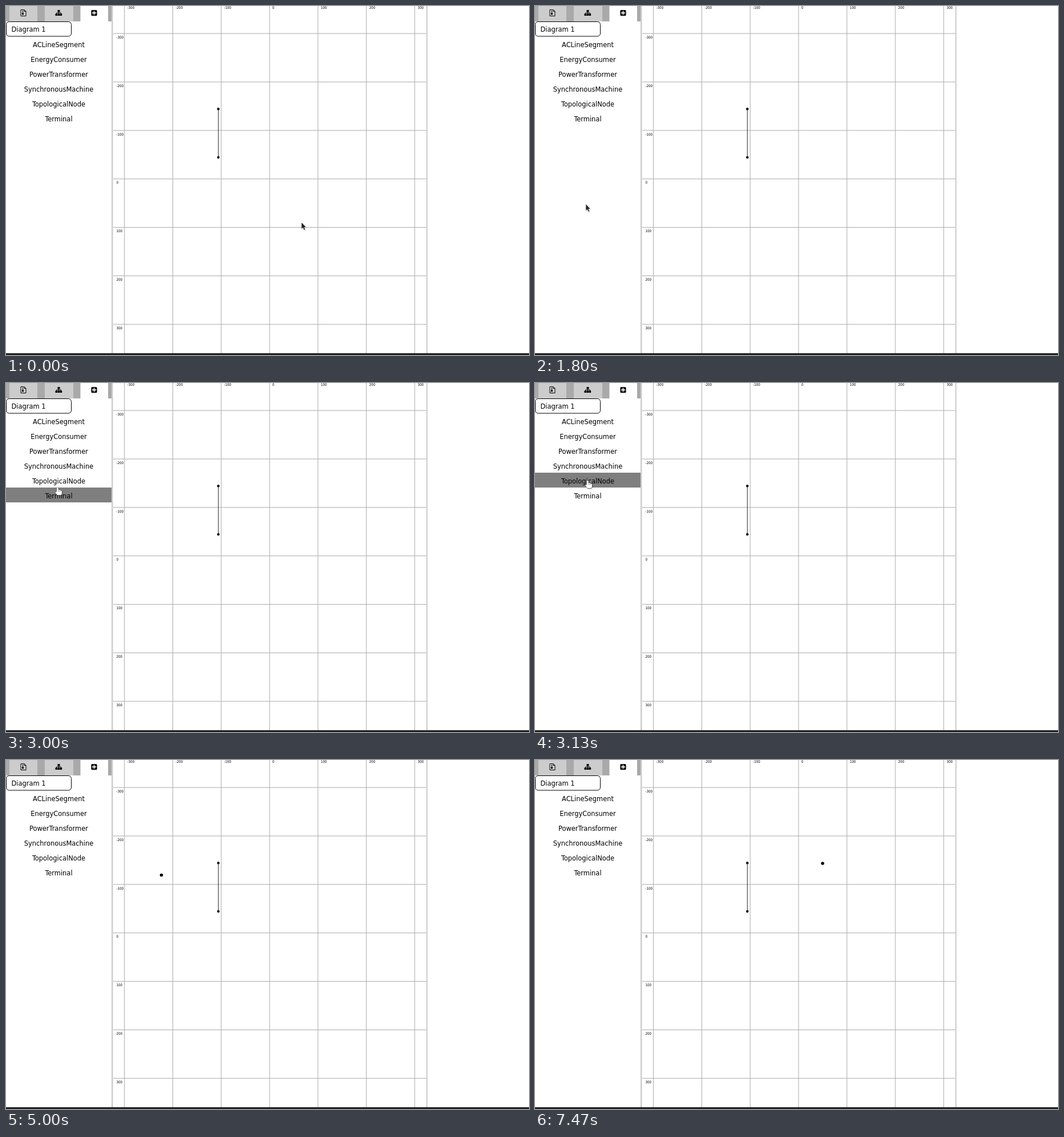
Write an HTML page with a canvas that moves like this. It is 917 px wide and 611 px high and loops after 8 s.

```html
<!DOCTYPE html>
<html lang="en">
<head>
<meta charset="utf-8">
<title>Diagram editor</title>
<style>
  html, body { margin: 0; width: 100%; height: 100%; overflow: hidden; background: #fff; }
  canvas { display: block; }
</style>
</head>
<body>
<canvas id="stage" width="917" height="611"></canvas>
<script>
const ctx = document.getElementById('stage').getContext('2d');
const LOOP = 8000, TICK = 200 / 3;
const ITEMS = ['ACLineSegment', 'EnergyConsumer', 'PowerTransformer',
  'SynchronousMachine', 'TopologicalNode', 'Terminal'];
const ROW_TOP = 53, ROW_H = 26, PANEL_W = 185;
const GRID = 84.85, ORIGIN = { x: 462.1, y: 302.7 };
const DRAG_TICK = 74;

// The pointer's journey; it carries the new node from DRAG_TICK on
const HOME = { x: 518, y: 379 };
const MOVES = [
  { from: 4, to: 10, x: 245, y: 396, sag: 36 },
  { from: 15, to: 20, x: 95, y: 370, sag: 13 },
  { from: 26, to: 31, x: 72, y: 284 },
  { from: 37, to: 47, x: 92, y: 170 },
  { from: 72, to: 75, x: 272.5, y: 201.5 },
  { from: 80, to: 85, x: 424, y: 182 },
  { from: 89, to: 94, x: 501, y: 186 },
  { from: 109, to: 112, x: 504.3, y: 181 },
];

const easeOut = k => 1 - (1 - k) ** 1.4;

function position(tick) {
  let { x, y } = HOME;
  for (const move of MOVES) {
    if (tick <= move.from) break;
    const k = Math.min(1, (tick - move.from) / (move.to - move.from));
    x += (move.x - x) * easeOut(k);
    y += (move.y - y) * easeOut(k) + (move.sag || 0) * Math.sin(Math.PI * k);
  }
  return { x, y };
}

function rect(color, x, y, w, h) {
  ctx.fillStyle = color;
  ctx.fillRect(x, y, w, h);
}

function dot(x, y, r) {
  ctx.fillStyle = '#000';
  ctx.beginPath();
  ctx.arc(x, y, r, 0, Math.PI * 2);
  ctx.fill();
}

function outline(path, color = '#000', width = 1) {
  ctx.strokeStyle = color;
  ctx.lineWidth = width;
  ctx.stroke(new Path2D(path));
}

function roundBox(x, y, w, h, r) {
  ctx.beginPath();
  ctx.roundRect(x, y, w, h, r);
}

const font = size => `semi-condensed ${size}px "DejaVu Sans Condensed", "DejaVu Sans", sans-serif`;

// Smaller text if only the regular width is available
ctx.font = font(12.73);
const FIT = Math.min(1, 123 / ctx.measureText('SynchronousMachine').width);

function label(text, x, y, size = 12.73, align = 'left') {
  ctx.fillStyle = '#000';
  ctx.font = font(size * FIT);
  ctx.textAlign = align;
  ctx.fillText(text, x, y);
}

function drawIcons() {
  outline('M32 6.5H26V17.5H35V9.5L32 6.5V9.5H35M29.5 8V13');
  dot(29.5, 13.8, 1.7);

  rect('#000', 90.5, 7, 4, 3.6);
  for (let i = 0; i < 3; i++) rect('#000', 86.5 + 4 * i, 13.4, 3.6, 3.6);
  outline('M88.5 14V12H96.5V14M92.5 10V14');

  ctx.fillStyle = '#000';
  roundBox(149.4, 7, 10.2, 10.2, 1.7);
  ctx.fill();
  outline('M151 12.1H158M154.5 8.6V15.6', '#fff', 1.6);
}

function drawPanel(hovered) {
  rect('#a9a9a9', 0, 0, PANEL_W, 27);
  rect('#ccc', 6, 0, 49, 27);
  rect('#ccc', 68, 0, 50, 27);
  rect('#fff', 130.5, 0, 48.5, 27);
  drawIcons();

  ctx.strokeStyle = '#000';
  ctx.lineWidth = 1;
  roundBox(0.5, 27.5, 114, 25.5, 5);
  ctx.stroke();
  label('Diagram 1', 9.5, 45.3);

  ITEMS.forEach((name, i) => {
    const top = ROW_TOP + i * ROW_H;
    if (i === hovered) rect('#7f7f7f', 0, top, PANEL_W, ROW_H);
    label(name, PANEL_W / 2, top + 19, 12.73, 'center');
  });
}

function drawGrid() {
  for (let i = -3; i <= 3; i++) {
    const x = ORIGIN.x + i * GRID, y = ORIGIN.y + i * GRID;
    rect('#aaa', x - 0.5, 0, 1, 608);
    rect('#aaa', 188, y - 0.5, 549, 1);
    label(i * 100, x + 5, 5.3, 6.2);
    label(i * 100, 193.5, y + 8.7, 6.2);
  }
  rect('#ccc', 185, 0, 2.5, 608);
  rect('#ccc', 737, 0, 2, 608);
}

function drawSegment() {
  outline('M372.3 180.3V265', '#000', 0.85);
  dot(372.3, 180.3, 2.2);
  dot(372.3, 265, 2.2);
}

const ARROW = new Path2D('M0 0V12L2.8 9.5L4.9 14.2L6.7 13.4L4.6 8.9L8.2 8.6Z');
const HAND = new Path2D('M-1.5 8V1.2Q0-.6 1.5 1.2V5Q5 4 7.8 7.5V10.5L6.6 14H-.4L-3.8 9.6Q-4.2 7.4-1.5 8Z');

function drawPointer({ x, y }, isHand) {
  ctx.save();
  ctx.translate(Math.round(x) + 0.3, Math.round(y) + 0.3);
  if (!isHand) ctx.scale(0.9, 0.9);
  ctx.lineJoin = 'round';
  ctx.lineWidth = 1;
  ctx.shadowColor = 'rgba(0,0,0,.3)';
  ctx.shadowBlur = 2;
  ctx.shadowOffsetX = ctx.shadowOffsetY = 1;
  ctx.strokeStyle = isHand ? '#222' : '#fff';
  ctx.fillStyle = isHand ? '#fff' : '#222';
  const shape = isHand ? HAND : ARROW;
  ctx.stroke(shape);
  ctx.shadowColor = 'transparent';
  ctx.fill(shape);
  if (isHand) outline('M2 5.5V8M4.7 6V8', '#777');
  ctx.restore();
}

function draw(time) {
  const tick = Math.floor(time / TICK + 0.055);
  // Hover feedback trails the pointer by one tick
  const over = position(tick - 1);
  const row = Math.floor((over.y - ROW_TOP) / ROW_H);
  const hovered = over.x < PANEL_W && row < ITEMS.length ? row : -1;

  rect('#fff', 0, 0, 917, 611);
  drawGrid();
  drawSegment();
  drawPanel(hovered);
  rect('#222', 0, 607.8, 917, 3.2);

  const now = position(tick);
  if (tick < DRAG_TICK) drawPointer(now, hovered >= 0);
  else dot(now.x, now.y, 2.8);
}

const start = performance.now();
function loop() {
  draw((performance.now() - start) % LOOP);
  requestAnimationFrame(loop);
}
loop();
</script>
</body>
</html>
```
